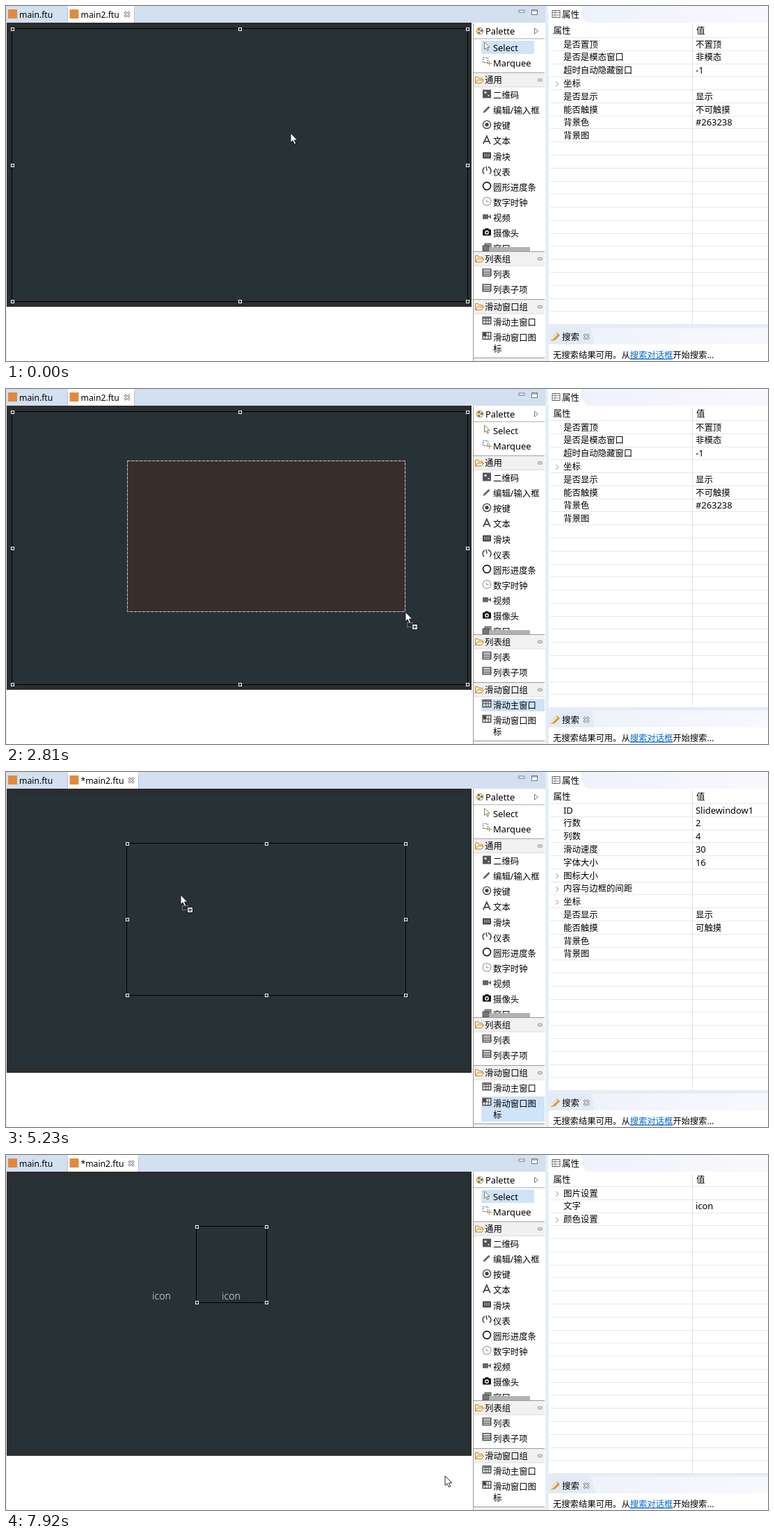
An HTML page that plays this animation: 1095 px wide and 511 px high, repeating every 7990 ms.

```html
<!DOCTYPE html>
<html lang="zh">
<head>
<meta charset="utf-8">
<title>Slide window editor</title>
<style>
html, body { margin: 0; width: 100%; height: 100%; overflow: hidden; background: #fff; }
svg { display: block; width: 100vw; height: 100vh; }
text { font-family: 'Noto Sans', 'Noto Sans CJK SC', sans-serif; white-space: pre; }
</style>
</head>
<body>
<svg id="stage" viewBox="0 0 1095 511"></svg>
<script>
const LOOP = 7990;
const PRESS = 1330, DRAG = 2180, DROP = 2990, PICK = [4460, 6500], PLACE = [5360, 7340];

const rect = (x, y, w, h, fill, more = '') =>
  `<rect x="${x}" y="${y}" width="${w}" height="${h}" fill="${fill}" ${more}/>`;
const path = (d, stroke, more = '') =>
  `<path d="${d}" fill="none" stroke="${stroke}" ${more}/>`;
const shape = (d, fill) => `<path d="${d}" fill="${fill}"/>`;
const ring = (x, y, r, stroke, w = 1.4, fill = 'none') =>
  `<circle cx="${x}" cy="${y}" r="${r}" fill="${fill}" stroke="${stroke}" stroke-width="${w}"/>`;
const at = (x, y, body) => `<g transform="translate(${x} ${y})">${body}</g>`;
const cjk = /[\u4e00-\u9fff]/;
// y is the middle of the line
const label = (x, y, s, size = cjk.test(s) ? 12.4 : 12.9) =>
  `<text x="${x}" y="${y + 4.6}" font-size="${size}" fill="#000">${s}</text>`;
const cross = (x, y) =>
  path(`M${x - 3.5} ${y - 3.5}l7 7m0 -7l-7 7`, '#777', 'stroke-width="3.2"') +
  path(`M${x - 3.2} ${y - 3.2}l6.4 6.4m0 -6.4l-6.4 6.4`, '#fff', 'stroke-width="1.3"');
const ARROW = 'M0 0V13.6L3.1 10.8L5.4 16L7.7 15L5.4 10H9.8Z';

// palette icons, drawn in a 13 x 13 cell
const grid = rect(.7, 1.2, 11.6, 10, '#fff', 'stroke="#444" stroke-width="1.4"');
const icons = {
  code: rect(.5, .5, 12, 12, '#555') + rect(3, 3, 3, 3, '#ddd') + rect(8, 8, 2, 2, '#ddd'),
  pen: shape('M1 12L2 9L9 2L11 4L4 11Z', '#666'),
  radio: ring(6.5, 6.5, 5.6, '#444') + ring(6.5, 6.5, 2.3, '#444', 1, '#444'),
  text: path('M1.2 12L6.3 1L11.4 12M3 8.5H9.7', '#444', 'stroke-width="1.7"'),
  slider: rect(.5, 2, 12, 9, '#444', 'rx="1"') + path('M3.5 4V9M6.5 4V9M9.5 4V9', '#ddd'),
  gauge: path('M2.6 11A5.8 5.8 0 0 1 3.5 1.6M8 .9A5.8 5.8 0 0 1 10.4 11M5.5 .5L6.5 6.5', '#444', 'stroke-width="1.5"'),
  circle: ring(6.5, 6.5, 5.5, '#111', 1.6),
  clock: path('M6.5 .5L11 2L12.5 6.5L11 11L6.5 12.5L2 11L.5 6.5L2 2ZM6 4V7H9', '#888'),
  video: rect(.5, 3, 8, 7, '#666') + shape('M8 6.5L12.5 3.5V9.5Z', '#666'),
  camera: rect(.5, 2.6, 12, 9, '#111', 'rx="1"') + rect(4, 1, 5, 3, '#111') + ring(6.5, 7, 2.2, '#fff'),
  windows: rect(3.5, 1, 9, 8, '#999', 'stroke="#555"') + rect(.6, 4, 9, 8, '#777', 'stroke="#444"'),
  list: grid + path('M1 4H12M1 6.4H12M1 8.8H12', '#444', 'stroke-width="1.2"'),
  slides: grid + path('M1 3H12M1 6.3H12M4 2V11M6.5 2V11M9.2 2V11', '#444'),
  slide: grid + rect(1, 2, 5, 4.5, '#444') + path('M1 6.5H12M4 2V11M8.5 2V11', '#444')
};

const item = (y, icon, name) => at(684.5, y - 8, icons[icon]) + label(700, y + .5, name);

function drawer(y, name) {
  return rect(672, y - 10, 102, 20, '#f1f1f1') +
    path(`M671 ${y - 10.5}H774`, '#999') + path(`M672 ${y + 10}H774`, '#ddd') +
    `<path d="M674.5 ${y + 4.5}v-9h4l1 2h5v2.5h2l-3 4.5ZM674.5 ${y + 4.5}l3 -4.5h7" fill="#fff0cc" stroke="#c8822a"/>` +
    label(688, y, name) +
    path(`M766 ${y - 2.5}l-2 2.5l2 2.5M768.5 ${y - 2.5}l2 2.5l-2 2.5M766 ${y - 1.2}h2.5m0 2.4h-2.5`, '#777', 'stroke-width=".9"');
}

function palette() {
  const common = [['code', '二维码'], ['pen', '编辑/输入框'], ['radio', '按键'], ['text', '文本'],
    ['slider', '滑块'], ['gauge', '仪表'], ['circle', '圆形进度条'], ['clock', '数字时钟'],
    ['video', '视频'], ['camera', '摄像头'], ['windows', '窗口']];
  return path('M671.5 25V511', '#999') + path('M672 47H774', '#aaa') +
    ring(681, 36, 5, '#b99662', 1, '#f3dfb4') +
    rect(678, 32, 3, 3, '#d05b3b') + rect(682, 34, 3, 3, '#4778b8') + rect(678, 37, 3, 3, '#58a050') +
    label(689, 36, 'Palette') + path('M759.5 32V40L764.5 36Z', '#777') +
    at(687.5, 52, `<path d="${ARROW}" transform="scale(.76)" fill="#fff" stroke="#7b6a45" stroke-width="1.2"/>`) +
    label(700, 60, 'Select') +
    path('M685.5 74.5h7v7h-7Z', '#3d5f91', 'stroke-dasharray="2 1.5"') +
    path('M694.5 79v7M691 82.5h7', '#c58a2c') + label(700, 82, 'Marquee') +
    drawer(106.5, '通用') +
    common.map(([icon, name], i) => item(128 + i * 22.1, icon, name)).join('') +
    rect(694, 347, 59, 6, '#b2b2b2') + rect(672, 353, 102, 4, '#fff') +
    drawer(364, '列表组') + item(385.5, 'list', '列表') + item(407.5, 'list', '列表子项') +
    drawer(433, '滑动窗口组') + item(454.5, 'slides', '滑动主窗口') +
    item(476.5, 'slide', '滑动窗口图') + label(700, 493, '标') +
    rect(672, 507, 102, 4, '#f1f1f1') + path('M671 506.5H774', '#999');
}

function sidePanels() {
  let rows = '';
  for (let i = 0; i < 23; i++) rows += path(`M782 ${Math.round(45 + i * 18.78) + .5}H1095`, '#e8e8e8');
  return rect(775, 0, 320, 511, '#e6ecf8') +
    rect(779, 0, 316, 24, 'url(#bar)') + shape('M779 24V0H826Q829 24 836 24Z', '#fff') +
    rect(785, 6.5, 11, 10, '#fff', 'stroke="#666"') + path('M785 9.5h11M789 7v9M785 13h11', '#888') +
    label(799, 12, '属性') +
    rect(780, 24, 315, 435, '#fff') + rows + path('M986.5 26V458', '#e2e2e2') +
    label(786.5, 35.5, '属性') + label(992, 35.5, '值') +
    rect(779, 463, 316, 24, 'url(#bar)') + shape('M779 487V463H838Q843 463 845 487Z', '#e3ebf7') +
    shape('M783 482l2 -5l7 -7l4 4l-7 7Z', '#d39a45') + path('M784 480l8 -8', '#fff3cf', 'stroke-width="2"') +
    label(799, 476.5, '搜索') + cross(834, 476) +
    rect(780, 487, 315, 24, '#fff') +
    label(786, 502, '无搜索结果可用。从<tspan fill="#0066cc" text-decoration="underline">搜索对话框</tspan>开始搜索...', 12.3);
}

const fileIcon = x => rect(x, 5, 13, 13, '#e08b3c');
const stage = document.getElementById('stage');
stage.innerHTML = `
  <defs><linearGradient id="bar"><stop stop-color="#edf1fa"/><stop offset="1" stop-color="#f8f9fd"/></linearGradient></defs>
  ${rect(0, 0, 1095, 511, '#fff')}
  ${rect(0, 0, 775, 24, '#d2e0f0')}${rect(0, 24, 1, 487, '#e6ecf8')}
  ${fileIcon(3)}${label(19, 12, 'main.ftu', 12.2)}
  <g id="tab"></g>
  ${rect(737, 6, 8, 3, '#fff', 'stroke="#777"')}${rect(755.5, 5.5, 8, 7, '#fff', 'stroke="#777"')}${path('M755 7h9', '#777')}
  ${rect(1, 24, 668, 409, '#2b2d2e')}${rect(8, 32, 656, 394, '#273237')}
  <g id="canvas"></g>
  <g id="hot"></g>
  ${palette()}${sidePanels()}
  <g id="props"></g>
  <g id="cursor"></g>`;

const cache = {};
function put(id, html) {
  if (cache[id] === html) return;
  document.getElementById(id).innerHTML = cache[id] = html;
}

// a leading ">" marks a row that can be opened
const sheets = [
  [['是否置顶', '不置顶'], ['是否是模态窗口', '非模态'], ['超时自动隐藏窗口', '-1'], ['>坐标'],
    ['是否显示', '显示'], ['能否触摸', '不可触摸'], ['背景色', '#263238'], ['背景图']],
  [['ID', 'Slidewindow1'], ['行数', '2'], ['列数', '4'], ['滑动速度', '30'], ['字体大小', '16'],
    ['>图标大小'], ['>内容与边框的间距'], ['>坐标'], ['是否显示', '显示'], ['能否触摸', '可触摸'],
    ['背景色'], ['背景图']],
  [['>图片设置'], ['文字', 'icon'], ['>颜色设置']]
];
const sheet = rows => rows.map(([name, value = ''], i) => {
  const y = 55 + i * 18.8, open = name[0] === '>';
  return (open ? path(`M790.5 ${y - 2.5}l3.2 3.5l-3.2 3.5`, '#888') : '') +
    label(801, y, open ? name.slice(1) : name) + label(991, y, value);
}).join('');

// outline with handles; the handles sit half a pixel inside it
function selection(x0, y0, x1, y1, sides) {
  const spot = (a, b, i) => Math.floor(((a + .5) * (2 - i) + (b - .5) * i) / 2) - 1.5;
  let out = rect(x0, y0, x1 - x0, y1 - y0, 'none', 'stroke="#000"');
  for (let i = 0; i < 3; i++) for (let j = 0; j < 3; j++) {
    if (i === 1 && j === 1 || !sides && (i === 1 || j === 1)) continue;
    out += rect(spot(x0, x1, i), spot(y0, y1, j), 4, 4, '#222', 'stroke="#fff"');
  }
  return out;
}
const caption = x =>
  `<text x="${x}" y="208" text-anchor="middle" style="font-family:'Open Sans',sans-serif" font-size="14" font-weight="300" fill="#fff">icon</text>`;

// time, x, y of the pointer tip
const moves = [
  [0, 409, 183], [165, 409, 183], [480, 530, 280], [760, 668, 410], [1010, 722, 453], [1330, 722, 453],
  [1500, 500, 335], [1710, 262, 198], [1880, 205, 140], [2110, 174, 103], [2120, 174, 103],
  [2290, 380, 212], [2500, 500, 280], [2810, 574, 321], [2930, 574, 321], [3300, 610, 380],
  [3760, 660, 449], [4210, 711, 481], [4600, 711, 481], [4860, 480, 330], [5100, 270, 190],
  [5300, 213, 151], [5430, 213, 151], [5700, 390, 275], [5980, 630, 430], [6250, 724, 475],
  [6320, 734, 478], [6500, 734, 478], [6740, 430, 265], [6950, 278, 155], [7160, 355, 164],
  [7525, 355, 164], [7760, 540, 360], [7920, 631, 462], [LOOP, 631, 462]
];
const STEP = 65;
function pointer(t) {
  const i = moves.findIndex((m, k) => k && t < m[0]);
  const [t0, x0, y0] = moves[i - 1], [t1, x1, y1] = moves[i];
  const n = Math.max(1, Math.round((t1 - t0) / STEP));
  const p = Math.floor((t - t0) / (t1 - t0) * n + 1e-6) / n;
  return [Math.round(x0 + (x1 - x0) * p), Math.round(y0 + (y1 - y0) * p)];
}

const between = (t, a, b) => t >= a && t < b;
const row = { select: [50, 76, 19], main: [446, 91, 18], icon: [467, 91, 36] };
const glow = (key, fill) => rect(683, row[key][0], row[key][1], row[key][2], fill);

function draw(t) {
  const [x, y] = pointer(t);
  const tool = between(t, PRESS, DROP) ? 'main'
    : PICK.some((p, i) => between(t, p, PLACE[i])) ? 'icon' : 'select';
  const dirty = t >= DROP, placed = PLACE.filter(p => t >= p).length;

  const end = dirty ? 191 : 185;
  put('tab', shape(`M88 24V3Q88 0 92 0H${end - 4}Q${end} 0 ${end} 4V24Z`, '#fff') +
    path(`M88.5 24V3M${end - .5} 3V24`, '#b5c3d6') + fileIcon(91.5) +
    label(107.5, 12, (dirty ? '*' : '') + 'main2.ftu', 12.2) + cross(end - 11, 12));

  let scene = '';
  for (let i = 0; i < placed; i++) scene += caption(223.5 + 100 * i);
  if (!dirty) scene += selection(8.5, 32.5, 663.5, 425.5, true);
  else if (!placed) scene += selection(173.5, 102.5, 574.5, 321.5, true);
  else scene += selection(73.5 + placed * 100, 102.5, 174.5 + placed * 100, 212.5, false);
  if (between(t, DRAG, DROP))
    scene += rect(174.5, 103.5, Math.max(1, x - 175), Math.max(1, y - 104), '#392d29',
      'stroke="#ddd" stroke-dasharray="3 1 1 1"');
  put('canvas', scene);

  let hot = glow(tool, '#cfe3f9');
  if (tool === 'select') for (const key of ['main', 'icon']) {
    const [top, w, h] = row[key];
    if (between(x, 683, 683 + w) && between(y, top, top + h)) hot += glow(key, '#ffe2ad');
  }
  put('hot', hot);
  put('props', sheet(sheets[dirty ? (placed ? 2 : 1) : 0]));

  let tip = `<path d="${ARROW}" fill="#fff" stroke="#111" stroke-width=".9"/>`;
  if (tool !== 'select' && x < 669)
    tip += path('M2.5 15.5h8v6h-8Z', '#bbb', 'stroke-dasharray="1 1"') +
      rect(9.5, 17.5, 8, 8, '#fff', 'stroke="#111"') + path('M11 21.5h5M13.5 19v5', '#111');
  put('cursor', at(x, y, tip));
}

const start = performance.now();
function tick() {
  draw((performance.now() - start) % LOOP);
  requestAnimationFrame(tick);
}
tick();
</script>
</body>
</html>
```
